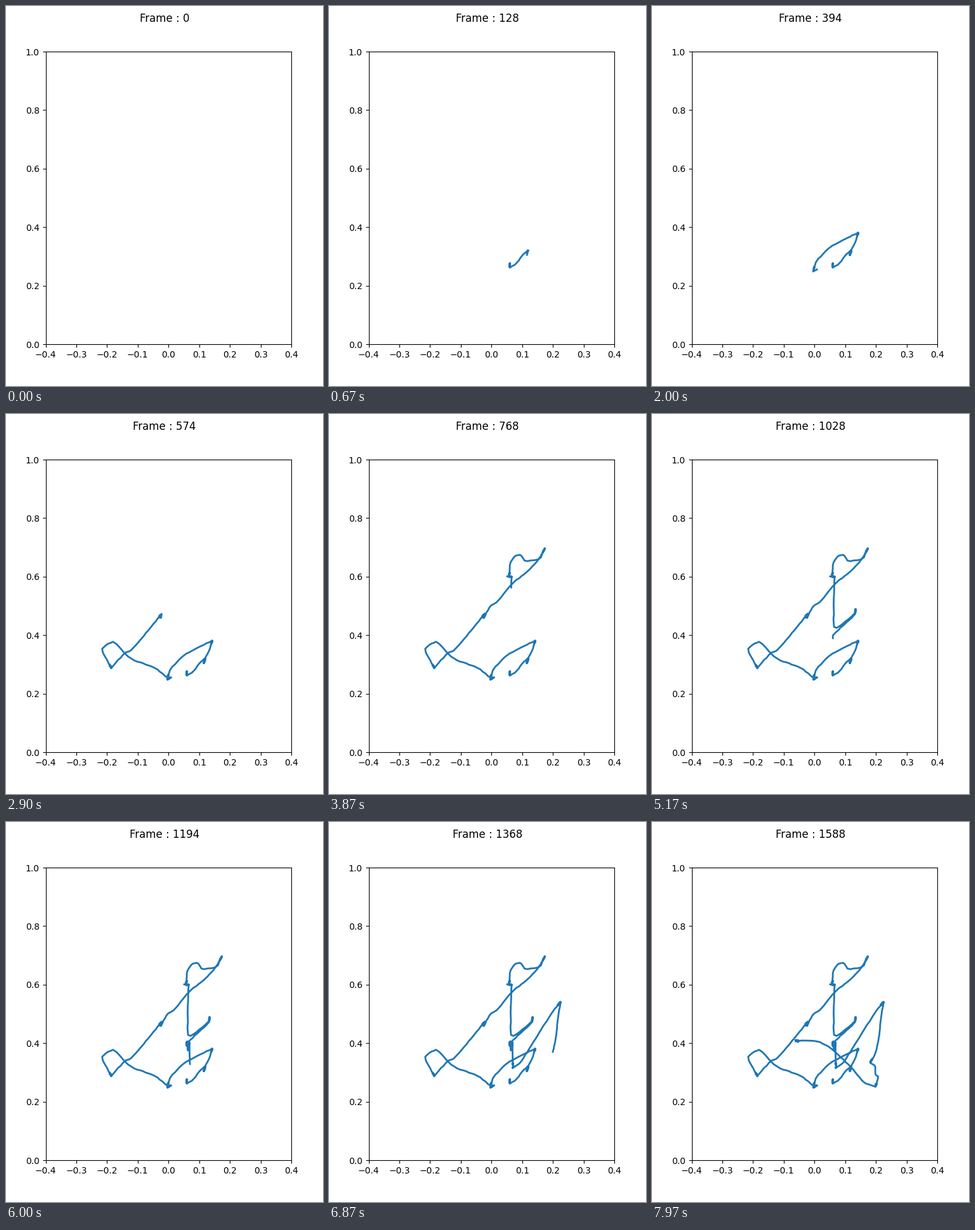
A matplotlib script that plays this animation: 500 by 600 pixels, repeating every 8000 ms.

```python
import random
import numpy as np
import matplotlib.pyplot as plt
from matplotlib.animation import FuncAnimation

W, H, DPI = 500, 600, 100
STEPS, LOOP = 240, 8000
SHARP = np.radians(80)   # turns above this make the pen linger
CUT = 0.15               # gentler corners are rounded off by this share

# Key points of the walk in pixels, grouped by the sample they are reached at.
ROUTE = {
    128: [(285, 406), (285, 413), (294, 408), (306, 392), (314, 386), (312, 393)],
    394: [(314, 385), (321, 372), (325, 358), (304, 368), (281, 380), (259, 402),
          (254, 419), (260, 416)],
    768: [(253, 416), (236, 401), (196, 387), (170, 359), (160, 363), (150, 372),
          (166, 401), (187, 377), (198, 373), (245, 316), (244, 322), (254, 303),
          (265, 297), (288, 268), (315, 247), (333, 226), (340, 212), (333, 229),
          (309, 233), (302, 222), (293, 224), (285, 236), (284, 257), (288, 257),
          (287, 277)],
    1028: [(286, 336), (292, 338), (320, 315), (321, 308), (320, 317), (285, 349),
           (285, 354)],
    1368: [(287, 347), (287, 360), (289, 348), (290, 388), (302, 380), (318, 354),
           (354, 297), (365, 284), (360, 316), (357, 345), (352, 366)],
    1588: [(344, 380), (352, 385), (352, 399), (357, 402), (352, 418), (334, 412),
           (314, 387), (281, 356), (262, 346), (226, 345), (230, 347)],
}

rng = random.Random(4)


def noise(r):
    return complex(rng.uniform(-r, r), rng.uniform(-r, r))


def line_to(path, cost, end):
    """Slightly rough line; its cost is its length."""
    start = path[-1]
    n = max(1, round(abs(end - start) / 5))
    for k in range(1, n + 1):
        path.append(start + (end - start) * k / n + (noise(0.4) if k < n else 0))
        cost.append(abs(end - start) / n)


def linger(path, cost, spot, back):
    """Tremble along the stroke that led to the spot."""
    for _ in range(10):
        path.append(spot + back * rng.uniform(0, 7) + noise(0.9))
        cost.append(6)
    path.append(spot)
    cost.append(6)


def walk(route):
    spots = [complex(*p) for pts in route.values() for p in pts]
    ends = np.cumsum([len(pts) for pts in route.values()]) - 1
    path, cost, marks = [spots[0]], [0], [0]
    for i in range(1, len(spots)):
        a, b, c = spots[i - 1], spots[i], spots[min(i + 1, len(spots) - 1)]
        sharp = c == b or abs(np.angle((c - b) / (b - a))) > SHARP
        line_to(path, cost, b if sharp else b + (a - b) * CUT)
        if i in ends:
            marks.append(sum(cost))
        if sharp:
            linger(path, cost, b, (a - b) / abs(a - b))
        else:
            path.append(b + (c - b) * CUT)
            cost.append(abs(path[-1] - path[-2]))
    return np.interp(np.cumsum(cost), marks, [0, *route]), np.array(path)


t, path = walk(ROUTE)

fig, ax = plt.subplots(figsize=(W / DPI, H / DPI), dpi=DPI)
fig.subplots_adjust(left=0.125, right=0.9, bottom=0.11, top=0.88)
ax.set_xlim(-0.4, 0.4)
ax.set_ylim(0, 1)
x = (path.real - 256) / (0.775 * W) * 0.8
y = (534 - path.imag) / (0.77 * H)

title = fig.suptitle("Frame : 0", y=0.98 + 1 / H, fontsize=12)
line, = ax.plot([], [], lw=2, color="C0")


def update(i):
    n = max(0, 2 * round(i * 10 / 3) - 6)
    title.set_text(f"Frame : {n}")
    if n:
        seen = t <= n
        line.set_data(np.append(x[seen], np.interp(n, t, x)),
                      np.append(y[seen], np.interp(n, t, y)))
    else:
        line.set_data([], [])
    return line, title


anim = FuncAnimation(fig, update, frames=STEPS, interval=LOOP / STEPS,
                     init_func=lambda: update(0), repeat=True, repeat_delay=0)
plt.show()
```
